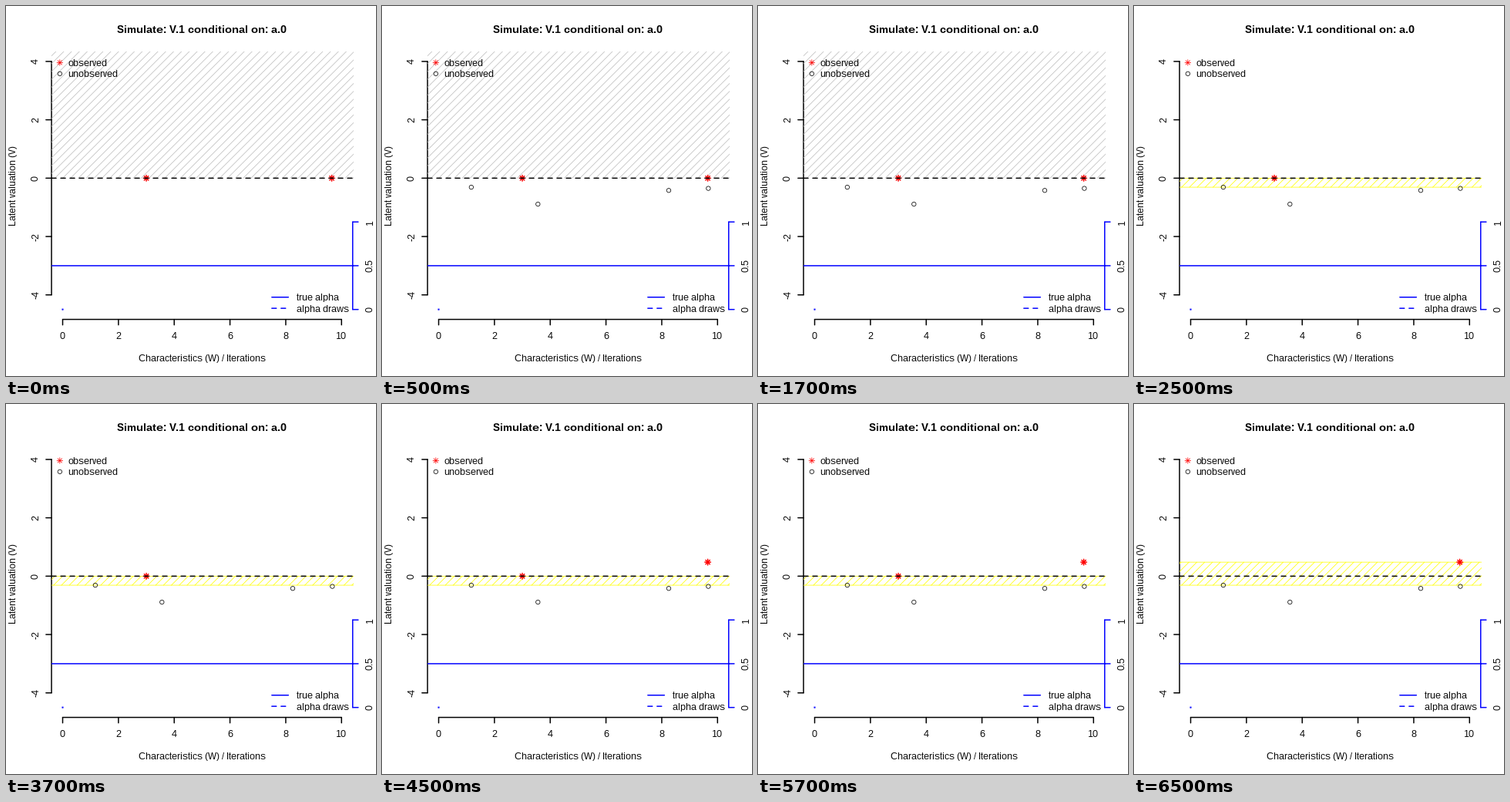
A matplotlib script for the animation above (8 s loop, 480 px wide and 480 px high).

```python
import math

import matplotlib.pyplot as plt
from matplotlib.animation import FuncAnimation
from matplotlib.collections import LineCollection
from matplotlib.patches import Circle, Rectangle

SIZE, DPI, STEP_MS, LOOP_MS = 480, 100, 500, 8000
PT = 72 / DPI  # points per pixel
plt.rcParams.update({
    "font.family": "Liberation Sans",
    "text.hinting": "native",
    "text.hinting_factor": 1,
    "path.snap": False,
    "lines.solid_capstyle": "round",
    "lines.dash_capstyle": "round",
    "lines.scale_dashes": False,
    "toolbar": "None",
})

LEFT, RIGHT, TOP, BOTTOM = 59.04, 449.76, 59.04, 406.56
TEXT_LINE, TICK = 14.4, 7.2
THIN, THICK = 0.75, 1.5
HATCH_GAP = 7.2 * math.sqrt(2)
FAR = 600

fig = plt.figure(figsize=(SIZE / DPI, SIZE / DPI), dpi=DPI, facecolor="white")
ax = fig.add_axes([0, 0, 1, 1])
ax.set(xlim=(0, SIZE), ylim=(SIZE, 0))
ax.axis("off")
plot_area = Rectangle((59, 59), 392, 348, transform=ax.transData)


def px(x):
    return LEFT + (RIGHT - LEFT) * (x + 0.4) / 10.8


def py(v):
    return TOP + (BOTTOM - TOP) * (4.34 - v) / 9.18


def stroke(xs, ys, color="black", width=THICK, clip=False, dashed=False, z=2):
    line, = ax.plot(xs, ys, color=color, lw=width * PT, zorder=z)
    if dashed:
        line.set_linestyle((0, (6 * PT, 6 * PT)))
    if clip:
        line.set_clip_path(plot_area)


def label(x, y, text, size=12, ha="center", **kwargs):
    ax.text(x, y, text, fontsize=size * PT, ha=ha, va="baseline", zorder=8, **kwargs)


def side_label(x, y, text):
    label(x, y, text, rotation=90, rotation_mode="anchor")


def star(x, y, arm=2.7, color="red", width=THICK):
    long = arm * math.sqrt(2)
    ends = [(long, 0), (0, long), (arm, arm), (arm, -arm)]
    segments = [[(x - dx, y - dy), (x + dx, y + dy)] for dx, dy in ends]
    return ax.add_collection(LineCollection(
        segments, colors=color, linewidths=width * PT, capstyle="round", zorder=5))


def ring(x, y):
    return ax.add_patch(Circle((x, y), 2.7, fill=False, ec="black",
                               lw=THIN * PT, zorder=6))


def hatch(high, low, color, border=False):
    """Diagonal lines in a band, in step with the data origin."""
    top, bottom = py(high), py(low)
    origin = px(0) + py(0)
    segments = []
    for k in range(-40, 60):
        c = origin + k * HATCH_GAP
        segments.append([(c - bottom, bottom), (c - top, top)])
    if border:
        segments += [[(-FAR, y), (FAR, y)] for y in (top, bottom)]
    lines = ax.add_collection(LineCollection(
        segments, colors=color, linewidths=THIN * PT, capstyle="round", zorder=3))
    lines.set_clip_path(plot_area)
    return lines


def draw_axes():
    label((LEFT + RIGHT) / 2, 35, "Simulate: V.1 conditional on: a.0", 14.4, weight="bold")
    label((LEFT + RIGHT) / 2, 461, "Characteristics (W) / Iterations")
    side_label(13, (TOP + BOTTOM) / 2, "Latent valuation (V)")

    stroke([px(0), px(10)], [BOTTOM] * 2)
    for x in range(0, 11, 2):
        stroke([px(x)] * 2, [BOTTOM, BOTTOM + TICK])
        label(px(x), 432, str(x))

    stroke([LEFT] * 2, [py(-4), py(4)])
    for v in range(-4, 5, 2):
        stroke([LEFT - TICK, LEFT], [py(v)] * 2)
        side_label(42, py(v), str(v))

    stroke([RIGHT] * 2, [py(-4.5), py(-1.5)], "blue")
    for alpha in (0, 0.5, 1):
        y = py(-4.5 + 3 * alpha)
        stroke([RIGHT, RIGHT + TICK], [y] * 2, "blue")
        side_label(476, y, str(alpha))

    stroke([LEFT, FAR], [py(-3)] * 2, "blue", clip=True)
    stroke([LEFT, FAR], [py(0)] * 2, clip=True, dashed=True, z=6)
    star(px(0), py(-4.5), 0.9, "blue", 0.5)


def draw_legends():
    top, x = TOP + TEXT_LINE, LEFT + 10.8
    star(x, top, width=THIN)
    ring(x, top + TEXT_LINE)
    label(x + 10.8, 78, "observed", ha="left")
    label(x + 10.8, 92, "unobserved", ha="left")

    low = BOTTOM - TEXT_LINE
    key = [344.8, 366.4]
    stroke(key, [low - TEXT_LINE] * 2, "blue")
    stroke(key, [low] * 2, "blue", dashed=True)
    label(377, 382, "true alpha", ha="left")
    label(377, 397, "alpha draws", ha="left")


draw_axes()
draw_legends()

UPPER, LOWER = 0.48, -0.31
# Each artist is visible from its start up to its end, in ms.
schedule = [
    (hatch(6, 0, "#bebebe"), 0, 2500),
    (hatch(0, LOWER, "yellow", border=True), 2500, 6500),
    (hatch(UPPER, LOWER, "yellow", border=True), 6500, LOOP_MS),
    (star(px(3), py(0)), 0, 6500),
    (star(px(9.65), py(0)), 0, 2500),
    (star(px(9.65), py(UPPER)), 4500, LOOP_MS),
]
for w, v in [(1.17, LOWER), (3.56, -0.89), (8.25, -0.42), (9.67, -0.35)]:
    schedule.append((ring(px(w), py(v)), 500, LOOP_MS))


def update(frame):
    now = frame * STEP_MS
    for artist, start, end in schedule:
        artist.set_visible(start <= now < end)
    return [artist for artist, _, _ in schedule]


animation = FuncAnimation(fig, update, frames=LOOP_MS // STEP_MS,
                          interval=STEP_MS, repeat=True, repeat_delay=0)
plt.show()
```
